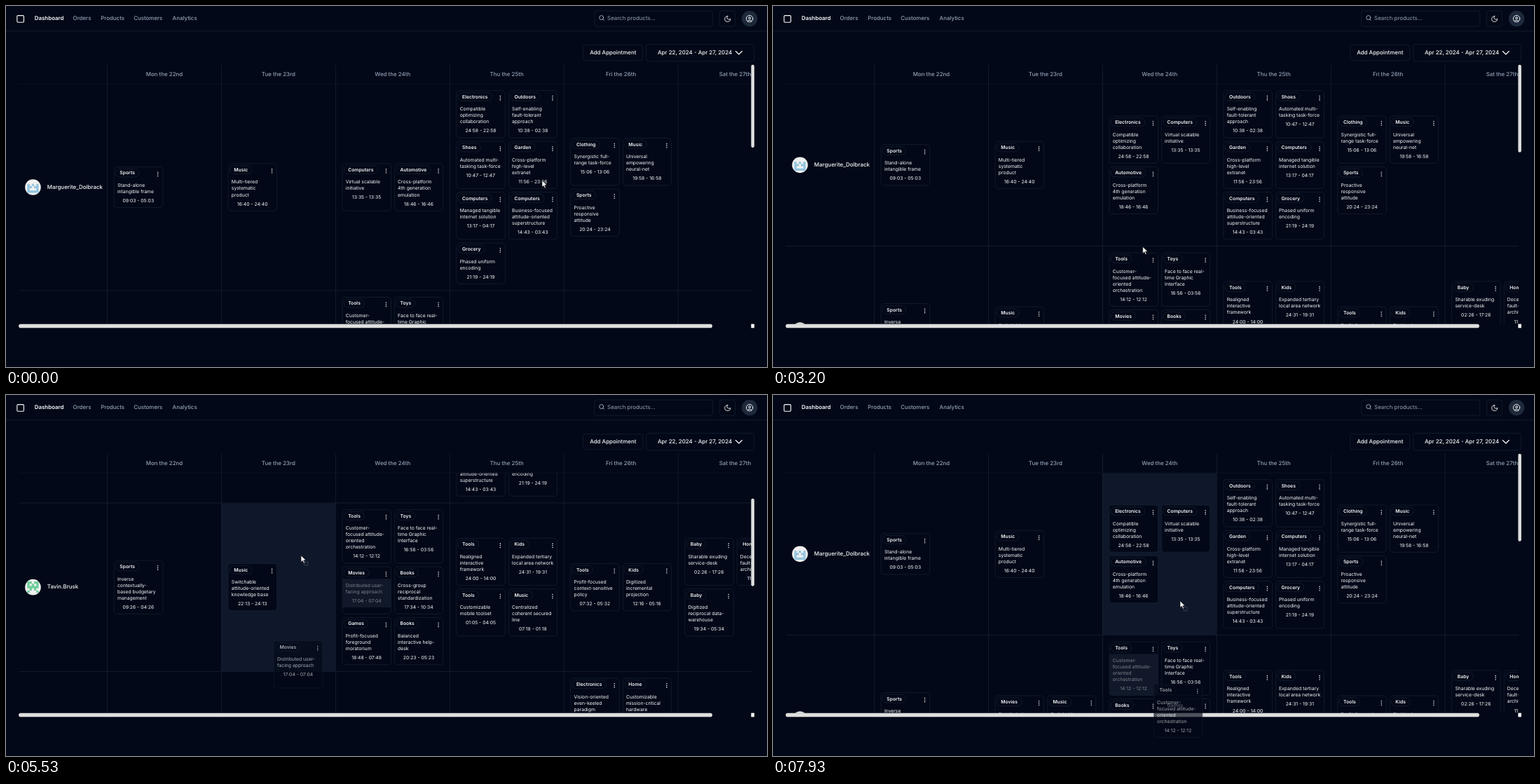
Recreate the animation shown at these times as an HTML page. Size 1086 by 515 pixels, loop 8000 ms.

```html
<!DOCTYPE html>
<html lang="en">
<head>
<meta charset="utf-8">
<title>Appointments</title>
<style>
  html, body { margin: 0; height: 100%; overflow: hidden; background: #020817; }
  /* Laid out on a 1920 px wide desktop, shown at 1086 px. */
  #stage {
    position: absolute; width: 1920px; height: 911px; overflow: hidden;
    transform: scale(.565625); transform-origin: 0 0;
    background: #020817; color: #f8fafc;
    font: 500 14px/20px Inter, sans-serif; text-rendering: geometricPrecision; white-space: pre;
  }
  #stage * { box-sizing: border-box; }
  #stage > * { position: absolute; }
  svg { display: block; fill: none; stroke: currentColor; stroke-width: 2; stroke-linecap: round; stroke-linejoin: round; }
  nav { left: 0; top: 0; width: 1920px; height: 64px; border-bottom: 1px solid #1e293b; }
  nav span { position: absolute; top: 22px; color: #94a3b8; }
  nav span:first-child { color: #f8fafc; font-weight: 600; }
  .brand { left: 27px; top: 23px; width: 19px; height: 19px; border: 2px solid; border-radius: 3px; }
  .box { display: flex; align-items: center; justify-content: center; border: 1px solid #1e293b; border-radius: 6px; }
  .search { justify-content: flex-start; color: #94a3b8; font-weight: 400; padding-left: 32px; }
  .search svg { position: absolute; left: 10px; top: 9px; color: #cbd5e1; }
  .account { border-radius: 50%; background: #1e293b; }
  .row { display: grid; grid-template-columns: 223px repeat(6, 288px); border-bottom: 1px solid #1e293b; }
  .row > * + * { border-left: 1px solid #1e293b; }
  .clip { left: 32px; width: 1849px; overflow: hidden; }
  .head { top: 148px; height: 49px; color: #94a3b8; text-align: center; line-height: 47px; }
  .head .row { height: 49px; }
  #view { top: 197px; height: 605px; }
  .user { display: flex; align-items: center; gap: 16px; padding-left: 16px; }
  .user svg { width: 40px; height: 40px; border-radius: 50%; background: #f0f0f0; stroke: none; }
  .cell { display: grid; grid-template-columns: 123.5px 123.5px; gap: 8px; padding: 16px; align-content: center; }
  .cell.hover { background: #0f172a; }
  .card {
    position: relative; border: 1px solid #1e293b; border-radius: 8px; background: #020817;
    font: 400 12px/16px Inter, sans-serif;
  }
  .badge {
    position: absolute; left: 3px; top: 4px; padding: 2px 10px;
    border: 1px solid #1e293b; border-radius: 99px; font-weight: 600;
  }
  .dots { position: absolute; left: 102.4px; top: 9.5px; }
  .body { margin-top: 30px; padding: 8px 8px 9px; }
  .time { margin-top: 7px; text-align: center; }
  .dragged .body { opacity: .5; background: #1e293b; }
  #ghost .card { position: absolute; width: 123.5px; opacity: .65; }
  .bar { background: #dedede; border-radius: 5px; }
</style>
</head>
<body>
<div id="stage">
  <nav></nav>
  <div class="brand"></div>
  <div class="box search" style="left:1484px;top:12px;width:300px;height:40px"><svg width="16" height="16" viewBox="0 0 24 24"><circle cx="11" cy="11" r="8"/><path d="m21 21-4.3-4.3"/></svg>Search products...</div>
  <div class="box" style="left:1800px;top:12px;width:40px;height:40px"><svg width="19" height="19" viewBox="0 0 24 24"><path d="M12 3a6 6 0 0 0 9 9 9 9 0 1 1-9-9Z"/></svg></div>
  <div class="box account" style="left:1856px;top:12px;width:40px;height:40px"><svg width="20" height="20" viewBox="0 0 24 24"><circle cx="12" cy="12" r="10"/><circle cx="12" cy="10" r="3"/><path d="M7 20.7V19a2 2 0 0 1 2-2h6a2 2 0 0 1 2 2v1.7"/></svg></div>
  <div class="box" style="left:1456px;top:98px;width:151px;height:40px">Add Appointment</div>
  <div class="box" style="left:1615px;top:96px;width:273px;height:44px;gap:7px">Apr 22, 2024 - Apr 27, 2024<svg width="20" height="20" viewBox="0 0 20 20" stroke-width="1.6"><path d="m2 6 8 8 8-8"/></svg></div>
  <div class="clip head"></div>
  <div class="clip" id="view"></div>
  <div class="bar" style="left:32px;top:802px;width:1750px;height:10px"></div>
  <div class="bar" id="thumb" style="left:1880px;width:8px"></div>
  <div style="left:1880px;top:802px;width:8px;height:10px;background:#fff"></div>
  <div id="ghost"></div>
  <svg id="cursor" width="30" height="30" viewBox="-1 -1 30 30" style="left:-1px;top:-1px">
    <path d="M0 0V16.5l4-3.7 2.8 6.4 2.7-1.2-2.8-6.2h5.5z" fill="#fff" stroke="#000" stroke-width="1"/>
    <path id="moving" d="M8.5 15.5h9v9h-9z" stroke="#cbd5e1" stroke-width="1" stroke-dasharray="1 2" stroke-linecap="butt"/>
  </svg>
</div>
<script>
const SCALE = 1086 / 1920;
const LOOP = 8000;
const $ = selector => document.querySelector(selector);

// Each day is a list of cards: category|title lines split by "/"|hours
const people = [
  { name: 'Marguerite_Dolbrack', color: '#93c5e0', pixels: [0, 21, 27, 17, 31], days: [
    ['Sports|Stand-alone/intangible frame|09:03 - 05:03'],
    ['Music|Multi-tiered/systematic/product|16:40 - 24:40'],
    ['Computers|Virtual scalable/initiative|13:35 - 13:35',
     'Automotive|Cross-platform/4th generation/emulation|18:46 - 16:46'],
    ['Electronics|Compatible/optimizing/collaboration|24:58 - 22:58',
     'Outdoors|Self-enabling/fault-tolerant/approach|10:38 - 02:38',
     'Shoes|Automated multi-/tasking task-force|10:47 - 12:47',
     'Garden|Cross-platform/high-level/extranet|11:56 - 23:56',
     'Computers|Managed tangible/internet solution|13:17 - 04:17',
     'Computers|Business-focused/attitude-oriented/superstructure|14:43 - 03:43',
     'Grocery|Phased uniform/encoding|21:19 - 24:19'],
    ['Clothing|Synergistic full-/range task-force|15:06 - 13:06',
     'Music|Universal/empowering/neural-net|19:58 - 16:58',
     'Sports|Proactive/responsive/attitude|20:24 - 23:24'],
    []] },
  { name: 'Tavin.Brusk', color: '#6ccf9a', pixels: [27, 21, 31, 10, 17], days: [
    ['Sports|Inverse/contextually-/based budgetary/management|09:26 - 04:26'],
    ['Music|Switchable/attitude-oriented/knowledge base|22:13 - 24:13'],
    ['Tools|Customer-/focused attitude-/oriented/orchestration|14:12 - 12:12',
     'Toys|Face to face real-/time Graphic/Interface|16:56 - 03:56',
     'Movies|Distributed user-/facing approach|17:04 - 07:04',
     'Books|Cross-group/reciprocal/standardization|17:34 - 10:34',
     'Games|Profit-focused/foreground/moratorium|18:48 - 07:48',
     'Books|Balanced/interactive help-/desk|20:23 - 05:23'],
    ['Tools|Realigned/interactive/framework|24:00 - 14:00',
     'Kids|Expanded tertiary/local area network|24:31 - 19:31',
     'Tools|Customizable/mobile toolset|01:05 - 04:05',
     'Music|Centralized/coherent secured/line|07:18 - 01:18'],
    ['Tools|Profit-focused/context-sensitive/policy|07:32 - 05:32',
     'Kids|Digitized/incremental/projection|12:16 - 05:16'],
    ['Baby|Sharable exuding/service-desk|02:26 - 17:26',
     'Home|Decentralized/fault-tolerant/architecture|11:34 - 18:34',
     'Baby|Digitized/reciprocal data-/warehouse|19:34 - 05:34']] },
  { name: 'Lorna.Pevik', color: '#d8a86c', pixels: [4, 14, 31, 21, 10], days: [
    [], [], [], [],
    ['Electronics|Vision-oriented/even-keeled/paradigm|08:15 - 10:15',
     'Home|Customizable/mission-critical/hardware|11:20 - 12:20',
     'Toys|Balanced/modular/interface|13:05 - 14:05',
     'Books|Managed/secondary/archive|15:40 - 16:40'],
    []] },
];

// row, day and index of the grabbed card; target row and day; pointer offset inside the card
const drags = [
  { start: 1370, hover: 1560, end: 2670, from: [0, 3, 0], to: [0, 2], grip: [31.5, 46] },
  { start: 5100, hover: 5260, end: 5870, from: [1, 2, 2], to: [1, 1], grip: [39, 37] },
  { start: 7370, hover: 7600, end: LOOP, from: [1, 2, 0], to: [0, 2], grip: [38, 40.5] },
];

// time, x, y
const pointerKeys = [
  [0, 765, 249], [370, 765, 249], [750, 577, 212], [1030, 655, 156], [1200, 673, 166],
  [1370, 673, 166], [2000, 558, 260], [2200, 524, 345], [2330, 528, 346], [3190, 528, 346],
  [3530, 517, 272], [3640, 517, 270], [3930, 517, 255], [4130, 517, 255], [4400, 516, 332],
  [4960, 516, 332], [5100, 518.5, 281.5], [5430, 426, 228], [5530, 421, 229], [5800, 424, 254],
  [6860, 424, 254], [7000, 436, 262], [7330, 517.5, 393], [7400, 517.5, 393],
  [7870, 573, 293.5], [7930, 581, 294],
];
// time, scroll offset
const scrollKeys = [[4100, 0], [4470, 53.7], [4930, 188.5], [6170, 188.5], [6530, 86], [6870, 0]];

function sample(keys, time) {
  const next = keys.findIndex(key => key[0] > time);
  if (next === 0) return keys[0].slice(1);
  if (next < 0) return keys.at(-1).slice(1);
  const a = keys[next - 1], b = keys[next];
  const k = (time - a[0]) / (b[0] - a[0]);
  return a.slice(1).map((v, i) => v + (b[i + 1] - v) * k);
}

function cardHtml(text) {
  const [category, title, hours] = text.split('|');
  const dots = [3.3, 8, 12.7].map(y => `<circle cx="8" cy="${y}" r="1.35"/>`).join('');
  return `<div class="card"><span class="badge">${category}</span>` +
    `<svg class="dots" width="16" height="16" fill="currentColor" style="fill:currentColor;stroke:none">${dots}</svg>` +
    `<div class="body">${title.replaceAll('/', '\n')}<div class="time">${hours}</div></div></div>`;
}

function avatarHtml({ color, pixels }) {
  let path = '';
  pixels.forEach((bits, y) => {
    for (let x = 0; x < 5; x++) if (bits >> x & 1) path += `M${x} ${y}h1v1h-1z`;
  });
  return `<svg viewBox="-1 -1 7 7"><path d="${path}" fill="${color}"/></svg>`;
}

function addBoard() {
  const board = document.createElement('div');
  board.innerHTML = people.map(person =>
    `<div class="row"><div class="user">${avatarHtml(person)}${person.name}</div>` +
    person.days.map(cards => `<div class="cell">${cards.map(cardHtml).join('')}</div>`).join('') +
    '</div>').join('');
  $('#view').append(board);
  return board;
}

$('nav').innerHTML = [['Dashboard', 72], ['Orders', 169], ['Products', 239], ['Customers', 322], ['Analytics', 420]]
  .map(([label, x]) => `<span style="left:${x}px">${label}</span>`).join('');
$('.head').innerHTML = '<div class="row"><div></div>' +
  ['Mon the 22nd', 'Tue the 23rd', 'Wed the 24th', 'Thu the 25th', 'Fri the 26th', 'Sat the 27th']
    .map(day => `<div>${day}</div>`).join('') + '</div>';

// One board per drag; dropping a card leads to the next board.
for (const drag of drags) {
  drag.board = addBoard();
  const cell = ([row, day]) => drag.board.children[row].children[day + 1];
  drag.card = cell(drag.from).children[drag.from[2]];
  drag.target = cell(drag.to);
  drag.ghost = drag.card.cloneNode(true);
  drag.ghost.style.height = drag.card.offsetHeight + 'px';
  $('#ghost').append(drag.ghost);
  const [row, day, index] = drag.from;
  const [moved] = people[row].days[day].splice(index, 1);
  people[drag.to[0]].days[drag.to[1]].unshift(moved);
}

function draw() {
  const time = performance.now() % LOOP;
  const [x, y] = sample(pointerKeys, time);
  const scroll = sample(scrollKeys, time)[0];
  const current = drags.find(drag => time < drag.end);
  const dragging = time >= current.start;
  const move = (px, py) => `translate(${px / SCALE}px, ${py / SCALE}px)`;

  for (const drag of drags) {
    const active = drag === current && dragging;
    drag.board.style.display = drag === current ? '' : 'none';
    drag.ghost.style.display = active ? '' : 'none';
    drag.card.classList.toggle('dragged', active);
    drag.target.classList.toggle('hover', active && time >= drag.hover);
  }
  current.board.style.transform = move(0, -scroll);
  current.ghost.style.transform = move(x - current.grip[0], y - current.grip[1]);
  $('#cursor').style.transform = move(x, y);
  $('#moving').style.display = dragging ? '' : 'none';
  $('#thumb').style.top = 148 + scroll / SCALE * .339 + 'px';
  $('#thumb').style.height = (current === drags[0] ? 209 : 221) + 'px';
  requestAnimationFrame(draw);
}
draw();
</script>
</body>
</html>
```
